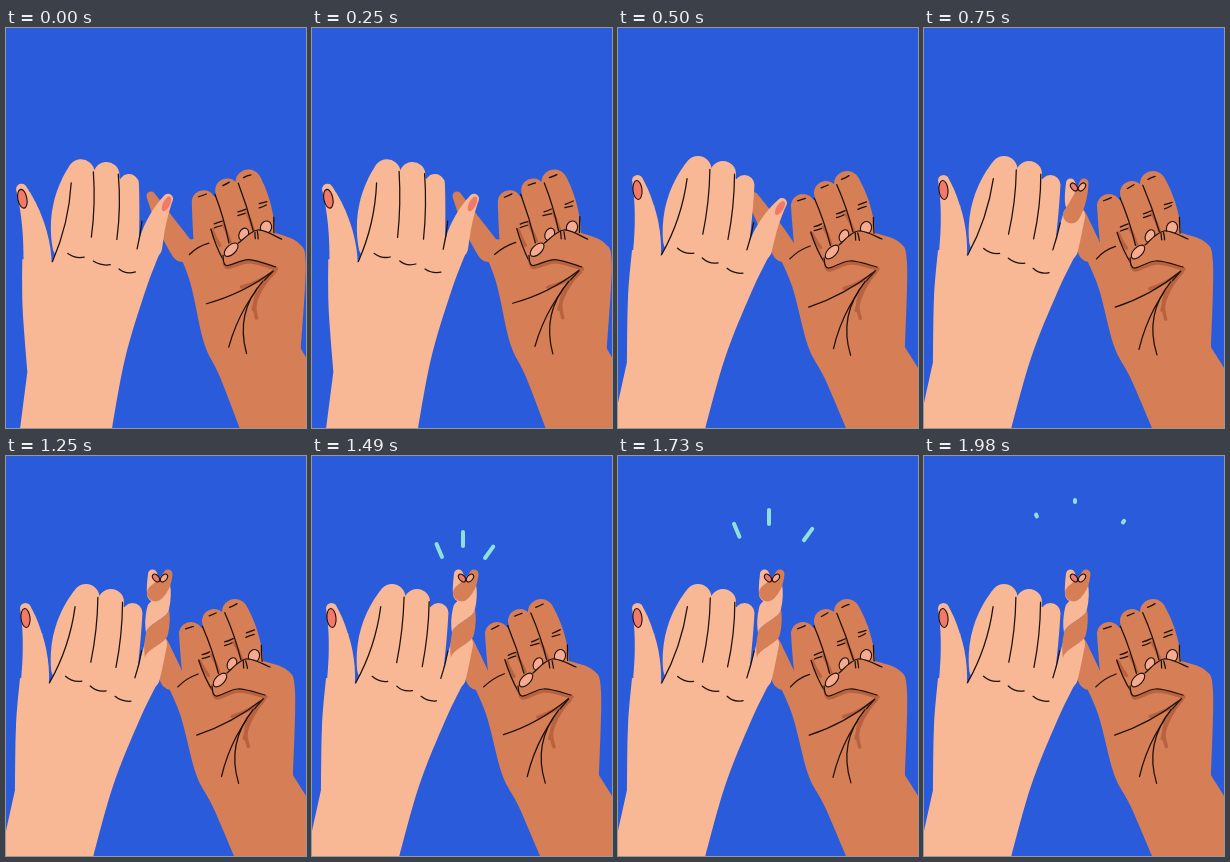
An HTML page with a canvas for the animation above (2150 ms loop, 300 px wide and 400 px high).

```html
<!DOCTYPE html>
<html lang="en">
<head>
<meta charset="utf-8">
<title>Pinky promise</title>
<style>
html, body { margin: 0; width: 100%; height: 100%; overflow: hidden; background: #2a5bdb; }
canvas { display: block; width: 100vw; height: 100vh; }
</style>
</head>
<body>
<canvas id="stage" width="300" height="400"></canvas>
<script>
const ctx = document.getElementById('stage').getContext('2d');
const LOOP = 2150;
const POSE_TIMES = [0, 250, 500, 750, 1000, 1250, 1330, 1490, 1650, 1730, 1810, 1980];
const TWIST_TOPS = [0, 151, 137, 114];
const FIRST_SPARK = 6;

const BLUE = '#2a5bdb', PEACH = '#f8b896', BROWN = '#d67e55', SHADE = '#b8623f';
const CORAL = '#f27868', PINK = '#f6ab90', INK = '#1c100b', SPARK = '#8fe0dc';

// Fingers: base x, y, radius, tip x, y, radius, bend
const leftFingers = [[62, 212, 17, 80, 141.5, 13.5, 13], [98, 210, 14, 105, 146, 13], [117, 215, 14, 126.5, 157, 10]];
const rightFingers = [[191, 225, 14, 185, 178, 12], [222, 210, 13, 208, 165, 12], [242, 205, 15, 229, 156, 13, -5]];

let seed = 1;
function wobble() {
  seed = seed * 16807 % 2147483647;
  return seed / 2147483647 - 0.5;
}

function controlPoint(x0, y0, x1, y1, bend) {
  const length = Math.hypot(x1 - x0, y1 - y0);
  return [(x0 + x1) / 2 + bend * (y1 - y0) / length, (y0 + y1) / 2 - bend * (x1 - x0) / length];
}

// Tapered, bent finger built from overlapping circles.
function limb(color, x0, y0, r0, x1, y1, r1, bend = 0) {
  const [cx, cy] = controlPoint(x0, y0, x1, y1, bend);
  const mix = (a, b, c, t) => (1 - t) ** 2 * a + 2 * t * (1 - t) * b + t * t * c;
  ctx.beginPath();
  for (let t = 0; t <= 1; t += 1 / 64) {
    const x = mix(x0, cx, x1, t), y = mix(y0, cy, y1, t), r = r1 + (r0 - r1) * (1 - t ** 1.5);
    ctx.moveTo(x + r, y);
    ctx.arc(x, y, r, 0, 2 * Math.PI);
  }
  ctx.fillStyle = color;
  ctx.fill();
}

// Smooth curve through a flat list of x, y pairs.
function curve(p, start = true) {
  const last = p.length / 2 - 1;
  const at = i => p.slice(2 * Math.max(0, Math.min(last, i))).slice(0, 2);
  if (start) ctx.moveTo(p[0], p[1]);
  else ctx.lineTo(p[0], p[1]);
  for (let i = 0; i < last; i++) {
    const [a, b, c, d] = [at(i - 1), at(i), at(i + 1), at(i + 2)];
    ctx.bezierCurveTo(
      b[0] + (c[0] - a[0]) / 6, b[1] + (c[1] - a[1]) / 6,
      c[0] - (d[0] - b[0]) / 6, c[1] - (d[1] - b[1]) / 6, c[0], c[1]);
  }
}

function shape(color, ...parts) {
  ctx.beginPath();
  parts.forEach((part, i) => curve(part, i === 0));
  ctx.fillStyle = color;
  ctx.fill();
}

function stroke(color, width) {
  ctx.strokeStyle = color;
  ctx.lineWidth = width;
  ctx.stroke();
}

function line(x0, y0, x1, y1, bend = 0, color = INK, width = 1.25) {
  const [cx, cy] = controlPoint(x0, y0, x1, y1, bend);
  ctx.beginPath();
  ctx.moveTo(x0 + wobble(), y0 + wobble());
  ctx.quadraticCurveTo(cx + wobble(), cy + wobble(), x1 + wobble(), y1 + wobble());
  stroke(color, width);
}

function crease(x0, y0, x1, y1, bend) {
  line(x0 + 1, y0 + 1, (x0 + x1) / 2 + 2, (y0 + y1) / 2, bend / 2, SHADE, 3.5);
  line(x0, y0, x1, y1, bend);
}

function nail(color, x, y, rx, ry, angle, outlined = true) {
  ctx.beginPath();
  ctx.ellipse(x, y, rx, ry, angle, 0, 2 * Math.PI);
  ctx.fillStyle = color;
  ctx.fill();
  if (outlined) stroke(INK, 1.1);
}

function posed(matrix, draw) {
  ctx.save();
  if (matrix) ctx.transform(...matrix);
  draw();
  ctx.restore();
}

function rightPinky(open, bands) {
  if (open) limb(BROWN, 177, 222, 12, 145, 168, 4.5, 2);
  else if (bands) limb(BROWN, 166, 222, 12, 152, 190, 11);
  else limb(BROWN, 166, 222, 12, 135, 170, 6);
}

function rightHand() {
  rightFingers.forEach(f => limb(BROWN, ...f));
  shape(BROWN,
    [156, 218, 174, 258, 190, 318, 207, 351, 233, 412],
    [310, 412, 310, 362, 287, 319],
    [287, 319, 289, 235, 281, 214, 257, 205],
    [229, 158, 208, 167, 185, 180, 178, 215]);

  rightFingers.forEach(([, , , x, y], i) => {
    line(x - 5, y - 5, x + 2, y - 8);
    for (const drop of [0, 4]) line(x + 11, y + 21 + drop, x + 19, y + 18 + drop);
    if (i < 2) {
      line(x + 20, y + 21, x + 28, y + 38, 1, SHADE, 3);
      line(x + 11, y - 8, x + 27, y + 39, 2);
    }
  });
  line(255, 189, 256, 205);
  crease(193, 204, 207, 236, -2);
  nail(PINK, 226, 208, 4.5, 6.5, 0.4);
  nail(PINK, 248, 200, 5.5, 6.5, 0.3);

  const under = [206, 230, 210, 240, 232, 233, 259, 239], over = [264, 211, 240, 203, 221, 217];
  posed([1, 0, 0, 1, 1, 2], () => { ctx.beginPath(); curve(under); stroke(SHADE, 3.5); });
  shape(BROWN, under, over);
  nail(PINK, 214, 224, 8.5, 4.5, -0.8);
  for (const edge of [under, over]) { ctx.beginPath(); curve(edge); stroke(INK, 1.25); }
  for (const x of [237, 240]) line(x, 205, x + 1, 212);

  line(172, 231, 192, 218, 3);
  crease(257, 243, 191, 279, 7);
  crease(257, 243, 215, 321, -12);
  crease(247, 254, 233, 327, -20);
}

function leftHand(bands) {
  limb(PEACH, 29, 225, 14, 19.5, 152.5, 5.5, -7);
  leftFingers.forEach(f => limb(PEACH, ...f));
  if (bands) limb(PEACH, 142, 221, 12, 150, 188, 11);
  else limb(PEACH, 142, 221, 12, 164, 175, 5, 5);
  shape(PEACH,
    [14, 222, 10, 270, 9, 334], [-6, 402],
    [86, 405, 107, 330, 133, 265, 153, 224],
    [130, 215, 125, 160, 105, 146, 80, 142, 60, 190, 43, 228]);

  nail(CORAL, 19.5, 162, 4.5, 9.5, -0.1);
  if (!bands) nail(CORAL, 162, 180, 3.5, 8, 0.55, false);

  line(69, 151, 44, 227, 7);
  leftFingers.slice(0, 2).forEach(([, , , x, y]) => line(x + 12, y, x + 5, y + 65, 3));
  line(136, 195, 129, 222, 1);
  for (let i = 0; i < 3; i++) {
    const x = 60 + 24.5 * i, y = 220 + 10 * i;
    line(x, y, x + 16, y + 5, -4);
  }
}

// Rope of half-turn bands; the last one runs out into the right fingertip.
function twist(bands) {
  const top = TWIST_TOPS[bands], last = bands - 1;
  const color = k => k % 2 ? PEACH : BROWN;
  const edge = k => Array.from({ length: 9 }, (_, i) =>
    [150.5 + k - 11.5 * Math.cos(Math.PI * i / 8), 202 - 25 * k - 3 * i]);

  limb(color(bands), 149, top + 24, 8, 146.5, top + 4, 4.5);
  for (let k = 0; k < last; k++) {
    const lower = edge(k), upper = edge(k + 1).reverse();
    const [right, left] = [upper[0], lower[0]];
    ctx.beginPath();
    lower.forEach(p => ctx.lineTo(...p));
    ctx.quadraticCurveTo(right[0] + 2, right[1] + 12, ...right);
    upper.forEach(p => ctx.lineTo(...p));
    ctx.quadraticCurveTo(left[0] - 2, left[1] - 12, ...left);
    ctx.fillStyle = color(k);
    ctx.fill();
  }
  limb(color(last), 147.5 + last, 187 - 25 * last, 8.5, 159 + bands, top + 4, 4.5, -3);

  const leftIsPeach = color(bands) === PEACH;
  nail(leftIsPeach ? CORAL : PINK, 150, top + 8, 4.5, 2.8, 0.9);
  nail(leftIsPeach ? PINK : CORAL, 158, top + 8, 4.5, 2.8, -0.9);
}

function sparks(step) {
  const tail = Math.max(0, 11 * (step - 1)), head = Math.min(46, 3 + 11 * step);
  for (const [x, y, angle] of [[130, 101, -0.4], [151, 90, 0], [173, 102, 0.63]]) {
    const dx = Math.sin(angle), dy = -Math.cos(angle);
    ctx.beginPath();
    ctx.moveTo(x + dx * tail, y + dy * tail);
    ctx.lineTo(x + dx * head, y + dy * head);
    stroke(SPARK, 4);
  }
}

function draw(time) {
  const pose = POSE_TIMES.filter(start => start <= time).length - 1;
  const open = pose < 2, bands = Math.max(0, Math.min(3, pose - 2));
  seed = 101 + pose % 3 * 977;
  ctx.fillStyle = BLUE;
  ctx.fillRect(0, 0, 300, 400);
  ctx.lineCap = ctx.lineJoin = 'round';
  rightPinky(open, bands);
  posed(open && [1, 0.05, -0.035, 1, 19, -13], rightHand);
  posed(open && [1, -0.09, 0.09, 1, -17.7, 10.5], () => leftHand(bands));
  if (bands) twist(bands);
  if (pose >= FIRST_SPARK) sparks(pose - FIRST_SPARK);
}

const begin = performance.now();
function tick() {
  draw((performance.now() - begin) % LOOP);
  requestAnimationFrame(tick);
}
tick();
</script>
</body>
</html>
```
